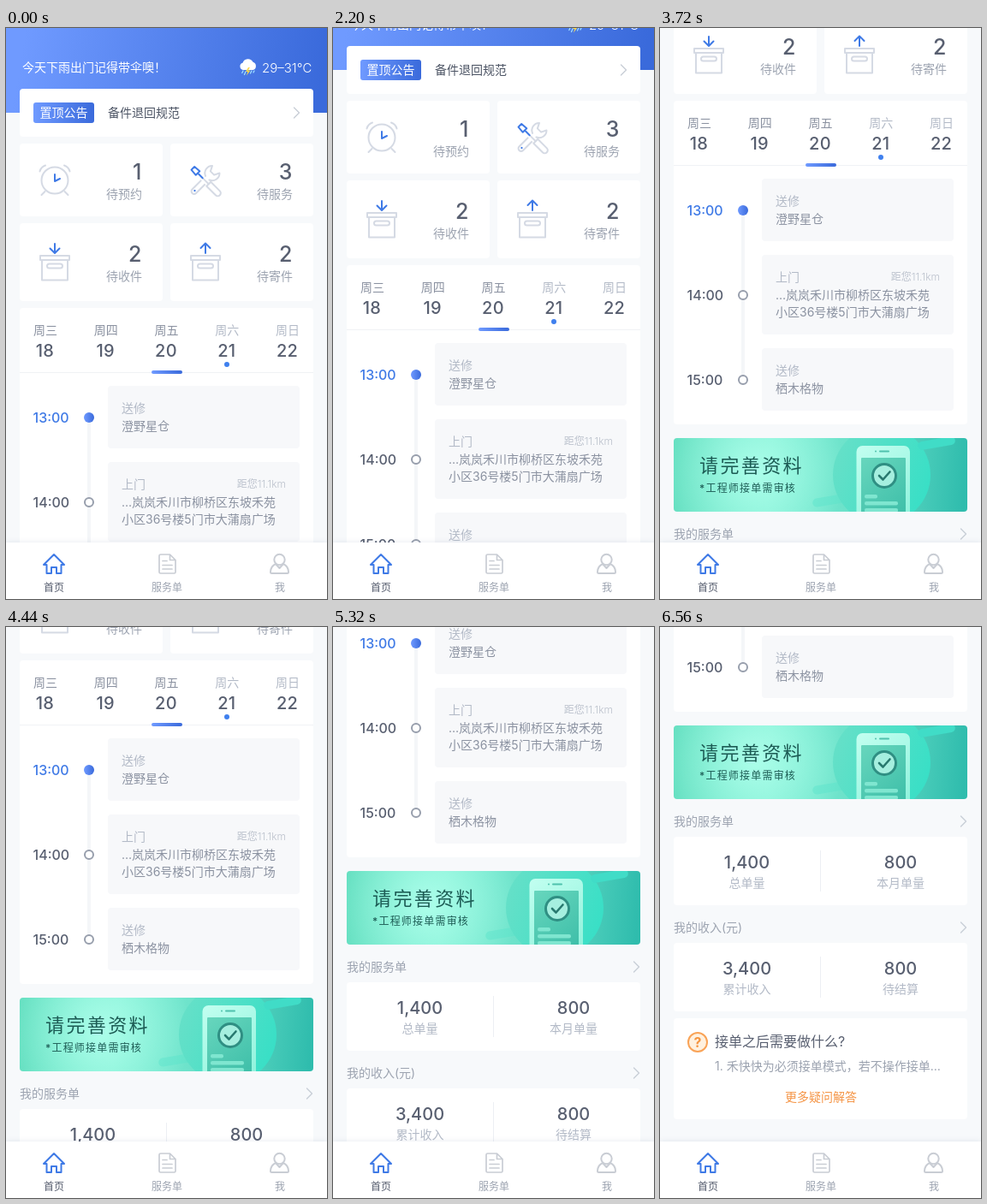
Write an HTML page with a canvas that moves like this. It is 375x667 px and loops after 7960 ms.

```html
<!DOCTYPE html>
<html lang="zh-CN">
<head>
<meta charset="utf-8">
<title>首页</title>
<style>
html, body { margin: 0; width: 100%; height: 100%; overflow: hidden; background: #f7f9fb; }
canvas { display: block; width: 375px; height: 667px; }
</style>
</head>
<body>
<canvas id="stage"></canvas>
<script>
const W = 375, H = 667, LOOP = 7960;
const FONT = 'Inter, "Noto Sans CJK SC", "Noto Sans CJK", sans-serif';
const BLUE = '#3f7ae6', DARK = '#585f70', MID = '#8b92a1', SOFT = '#9ca3b0', PALE = '#b3bac7', LINE = '#d5dae4';

// [time, scroll]: each position holds until the next one
const SCROLL = [
  [0, 0], [800, 2], [960, 5], [1080, 10], [1240, 22], [1400, 36], [1600, 46],
  [2200, 50], [2320, 60], [2440, 76], [2560, 94], [2720, 116], [2840, 130],
  [3280, 137], [3400, 157], [3480, 184], [3600, 216], [3720, 242],
  [4280, 250], [4360, 266], [4440, 288], [4520, 318], [4640, 352],
  [5120, 366], [5240, 402], [5320, 436], [5400, 462],
  [5880, 474], [5960, 504], [6040, 540], [6200, 573], [6360, 604], [6560, 606]
];

const canvas = document.getElementById('stage');
const ctx = canvas.getContext('2d');
const dpr = window.devicePixelRatio || 1;
canvas.width = W * dpr;
canvas.height = H * dpr;

// y is the visual middle of the line
function text(s, x, y, size, color, { weight = 400, align = 'left', spacing = 0 } = {}) {
  ctx.font = `${weight} ${size}px ${FONT}`;
  ctx.textAlign = align;
  ctx.letterSpacing = spacing + 'px';
  ctx.fillStyle = color;
  ctx.fillText(s, x, y + size * 0.37);
}

function box(x, y, w, h, r, fill) {
  ctx.beginPath();
  ctx.roundRect(x, y, w, h, r);
  ctx.fillStyle = fill;
  ctx.fill();
}

function disc(x, y, r, fill, stroke, width = 2) {
  ctx.beginPath();
  ctx.arc(x, y, r, 0, Math.PI * 2);
  if (fill) { ctx.fillStyle = fill; ctx.fill(); }
  if (stroke) { ctx.strokeStyle = stroke; ctx.lineWidth = width; ctx.stroke(); }
}

function line(d, color, width = 2, fill) {
  const p = new Path2D(d);
  if (fill) { ctx.fillStyle = fill; ctx.fill(p); }
  ctx.strokeStyle = color;
  ctx.lineWidth = width;
  ctx.stroke(p);
}

function ramp(x0, y0, x1, y1, ...colors) {
  const g = ctx.createLinearGradient(x0, y0, x1, y1);
  colors.forEach((c, i) => g.addColorStop(i / (colors.length - 1), c));
  return g;
}

const blueRamp = (x, w, y = 0, h = 0) => ramp(x, y, x + w, y + h, '#6f9aff', '#3a6adb');

function at(x, y, draw, angle = 0) {
  ctx.save();
  ctx.translate(x, y);
  ctx.rotate(angle);
  draw();
  ctx.restore();
}

const card = (x, y, w, h) => box(x, y, w, h, 4, '#fff');
const chevron = (x, y) => line(`M${x} ${y - 6}l6 6l-6 6`, '#c9ced7', 1.4);

function weather() {
  ctx.fillStyle = '#fff';
  ctx.fill(new Path2D('M277 49a4.2 4.2 0 0 1-.5-8.2a6.5 6.5 0 0 1 12-1a4.8 4.8 0 0 1 0 9.2z'));
  line('M277 50l-1.2 2.5M280 51l-1.5 3.5M287 50l-1.5 3M290 50l-1 2', '#9fe0ff', 1.3);
  ctx.fillStyle = '#ffd84a';
  ctx.fill(new Path2D('M283 46l-3 5h2.4l-1.4 4.5l4.5-6h-2.6l2-3.5z'));
}

function header() {
  ctx.fillStyle = blueRamp(20, 345, 20, 60);
  ctx.fillRect(0, 0, W, 99);
  text('今天下雨出门记得带伞噢！', 19, 46, 14, '#fff', { weight: 500 });
  weather();
  text('29–31℃', 299, 46, 15, '#fff', { weight: 300 });
  card(16, 71, 343, 56);
  box(32, 87, 71, 24, 3, blueRamp(32, 71));
  text('置顶公告', 67.5, 99, 14, '#fff', { weight: 500, align: 'center' });
  text('备件退回规范', 119, 99, 14, '#4c5464');
  chevron(336.5, 99);
}

function clock() {
  disc(0, 0, 15.5, null, LINE);
  line('M-17.5 -10.5a10 10 0 0 1 6.500-7M17.500 -10.500a10 10 0 0 0 -6.500-7M-11.500 13l-4 4M11.500 13l4 4', LINE);
  line('M0 -7V1L6 -2', BLUE);
}

function tools() {
  at(0, 0, () => {
    line('M4-3.2H-18A3.2 3.2 0 0 0-18 3.2H4A8.5 8.5 0 0 0 18 6L12 3V-3L18-6A8.5 8.5 0 0 0 4-3.2Z', LINE, 2);
    disc(-17, 0, 1.2, BLUE);
  }, -Math.PI / 4);
  at(0, 0, () => {
    ctx.fillStyle = '#fff';
    ctx.fillRect(-8, -3, 14, 6);
    line('M6-3.500H21A3.500 3.500 0 0 1 21 3.500H6Z', LINE, 2, '#fff');
    line('M6 0H-3', LINE);
    line('M-20-2.600L-12-3.200V3.200L-20 2.600ZM-12 0H-4', BLUE);
  }, Math.PI / 4);
}

function parcel(up) {
  line('M-17 -13H17V-8H-17ZM-15 -8V15.500H15V-8M-6.500 -3.500H6.500A2.200 2.200 0 0 1 6.500 1.500H-6.500A2.200 2.200 0 0 1 -6.500 -3.500Z', LINE);
  line(up ? 'M0 -16V-27M-5.500 -22L0 -27.500L5.500 -22' : 'M0 -27V-16.500M-5.500 -21.500L0 -16L5.500 -21.500', BLUE);
}

function stats() {
  const items = [
    [16, 135, 85, 168, '1', '待预约', () => at(57, 178, clock)],
    [192, 135, 85, 168, '3', '待服务', () => at(232.5, 178, tools)],
    [16, 228, 91, 264, '2', '待收件', () => at(57, 279, () => parcel(false))],
    [192, 228, 91, 264, '2', '待寄件', () => at(233, 279, () => parcel(true))]
  ];
  for (const [x, y, h, mid, num, label, icon] of items) {
    card(x, y, 167, h);
    icon();
    text(num, x + 142.5, mid, 25, DARK, { weight: 500, align: 'right' });
    text(label, x + 143, mid + 26, 14, SOFT, { align: 'right' });
  }
}

function week() {
  card(16, 327, 343, 378);
  [...'三四五六日'].forEach((d, i) => {
    const x = 46 + i * 70.75;
    text('周' + d, x, 353, 14, i > 2 ? PALE : MID, { align: 'center' });
    text(String(18 + i), x - 0.5, 377, 20, DARK, { weight: 500, align: 'center', spacing: 0.3 });
  });
  ctx.fillStyle = '#f0f2f5';
  ctx.fillRect(16, 402, 343, 1);
  box(170, 400, 36, 4, 2, blueRamp(170, 36));
  disc(258, 393, 3, '#3f80ee');
}

function schedule() {
  box(95, 455, 4, 198, 0, '#f4f6f8');
  const rows = [
    [418, 73, '13:00', '送修', ['澄野星仓']],
    [507, 93, '14:00', '上门', ['…岚岚禾川市柳桥区东坡禾苑', '小区36号楼5门市大蒲扇广场']],
    [616, 73, '15:00', '送修', ['栖木格物']]
  ];
  rows.forEach(([y, h, time, kind, lines], i) => {
    const mid = 455 + i * 99;
    text(time, 31.5, mid, 16, i ? DARK : BLUE, { weight: 500 });
    if (i) disc(97, mid, 5, '#fff', '#979eac');
    else disc(97, mid, 6, blueRamp(91, 12));
    box(119, y, 224, h, 4, '#f7f8fa');
    text(kind, 135, y + 26, 14, PALE);
    lines.forEach((s, n) => text(s, 135, y + 47 + n * 20, 14, MID));
  });
  text('距您11.1km', 327, 533, 12, '#bcc2cd', { weight: 300, align: 'right' });
}

function banner() {
  ctx.save();
  ctx.translate(0, 721);
  ctx.beginPath();
  ctx.roundRect(16, 0, 343, 86, 4);
  ctx.clip();
  ctx.fillStyle = ramp(16, 0, 359, 30, '#64dfc0', '#7eeed3', '#68dfc8', '#2fbcad');
  ctx.fillRect(16, 0, 343, 86);
  const glow = ctx.createRadialGradient(112, 40, 5, 112, 40, 105);
  glow.addColorStop(0, 'rgba(174,255,235,.9)');
  glow.addColorStop(1, 'rgba(174,255,235,0)');
  ctx.fillStyle = glow;
  ctx.fillRect(16, 0, 343, 86);
  at(198, 73, () => box(-20, -5, 40, 10, 5, 'rgba(90,226,202,.45)'), -0.17);
  disc(259, 43, 57, ramp(202, 20, 316, 60, '#66e0c8', '#38dfc6'));
  at(323, 6, () => box(-22, -5, 44, 10, 5, '#40dcc7'), -0.17);

  box(229.5, 9, 62.5, 100, 7, ramp(230, 9, 292, 90, '#c2fff0', '#8ff2dc'));
  box(235, 23, 52, 80, 1, ramp(235, 23, 287, 86, '#67d6bd', '#3fbfa9'));
  box(251, 14.5, 2, 2, 1, '#4fc2ad');
  box(256, 14.5, 12, 2, 1, '#4fc2ad');
  disc(262, 44, 13.5, '#a5efdf', '#2f8f83', 3);
  line('M256 44l4.500 4.500l8-9', '#28796f', 2.6);
  for (const [y, w] of [[66, 15], [74, 39], [82, 39]]) box(239, y, w, 4.5, 2, '#7fe6d0');

  text('请完善资料', 46, 32, 22, '#1c5b54', { spacing: 2.4 });
  text('*工程师接单需审核', 46, 59, 12, '#1c5b54', { weight: 500, spacing: 1.2 });
  ctx.restore();
}

function summary(y, title, pairs) {
  text(title, 16, y, 14, SOFT);
  chevron(351.5, y);
  card(16, y + 18, 343, 80);
  ctx.fillStyle = '#eceff3';
  ctx.fillRect(187, y + 34, 1, 48);
  pairs.forEach(([num, label], i) => {
    const x = i ? 281 : 101.5;
    text(num, x, y + 48, 20, DARK, { weight: 500, align: 'center' });
    text(label, x, y + 72, 14, PALE, { align: 'center' });
  });
}

function help() {
  card(16, 1063, 343, 118);
  disc(44, 1091, 11, '#fff1df', '#f9a357', 2);
  text('?', 44, 1091, 16, '#f5943f', { weight: 700, align: 'center' });
  text('接单之后需要做什么?', 64, 1090, 16, DARK);
  text('1. 禾快快为必须接单模式，若不操作接单…', 64, 1119, 14, SOFT);
  text('更多疑问解答', 188, 1155, 14, '#f59546', { weight: 500, align: 'center' });
}

function tabs() {
  ctx.save();
  ctx.shadowColor = 'rgba(70,90,130,.13)';
  ctx.shadowBlur = 6 * dpr;
  ctx.fillStyle = '#fff';
  ctx.fillRect(0, 601, W, 66);
  ctx.restore();
  line('M44 627L56 615L68 627H64.500V637H59V630H53V637H47.500V627Z', BLUE, 2);
  const gray = '#c9cdd4';
  line('M180.500 615H191.500L198 621.500V635.500A1.500 1.500 0 0 1 196.500 637H180.500A1.500 1.500 0 0 1 179 635.500V616.500A1.500 1.500 0 0 1 180.500 615ZM191.500 615V621.500H198', gray, 1.7);
  line('M183 622.500H188M183 627.500H194M183 632H194', gray, 1.7);
  disc(319.5, 621, 6.2, null, gray, 2);
  line('M315 626C311 628 309 631 309 635.500Q309 637 310.500 637H328.500Q330 637 330 635.500C330 631 328 628 324 626L319.500 631Z', gray, 2, '#fff');
  text('首页', 56, 654, 12, DARK, { align: 'center' });
  text('服务单', 188, 654, 12, SOFT, { align: 'center' });
  text('我', 320, 654, 12, SOFT, { align: 'center' });
}

function scrollAt(t) {
  let y = 0;
  for (const [time, pos] of SCROLL) if (t >= time) y = pos;
  return y;
}

function render() {
  const y = scrollAt(performance.now() % LOOP);
  ctx.setTransform(dpr, 0, 0, dpr, 0, 0);
  ctx.lineJoin = ctx.lineCap = 'round';
  ctx.fillStyle = '#f7f9fb';
  ctx.fillRect(0, 0, W, H);
  ctx.save();
  ctx.translate(0, -y);
  header();
  stats();
  week();
  schedule();
  banner();
  summary(833, '我的服务单', [['1,400', '总单量'], ['800', '本月单量']]);
  summary(957, '我的收入(元)', [['3,400', '累计收入'], ['800', '待结算']]);
  help();
  ctx.restore();
  tabs();
  requestAnimationFrame(render);
}
render();
</script>
</body>
</html>
```
